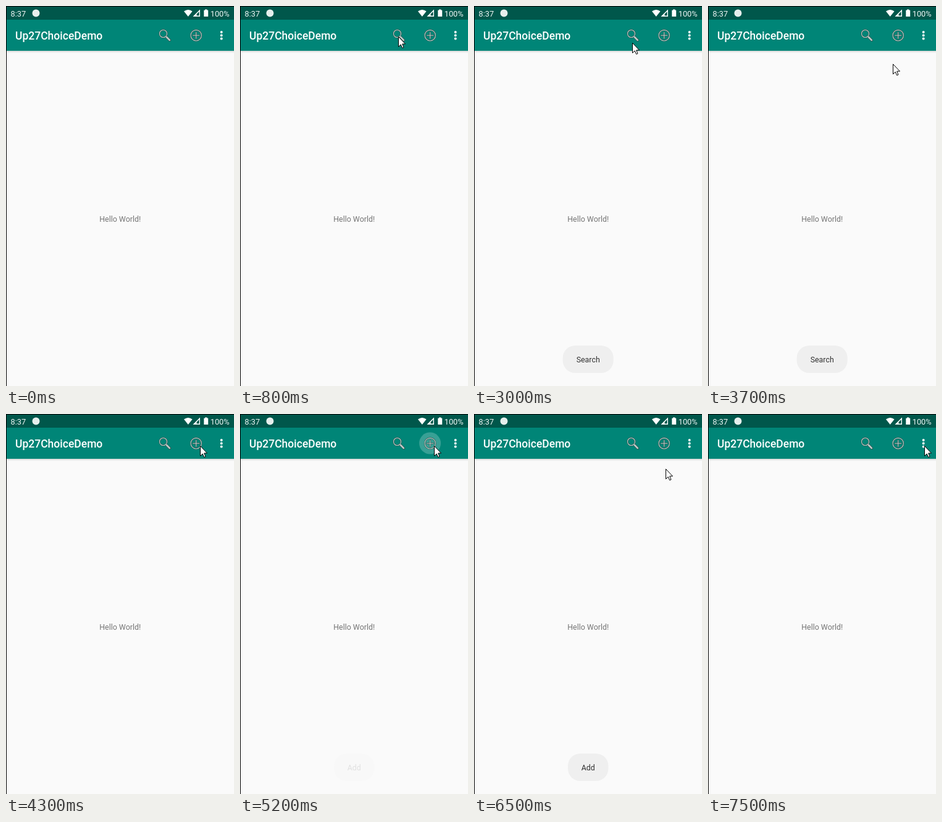
Recreate the animation shown at these times as an HTML page. Size 369x611 px, loop 8 s.

```html
<!DOCTYPE html>
<html lang="en">
<head>
<meta charset="utf-8">
<title>Toolbar menu</title>
<style>
  html, body { margin: 0; width: 100%; height: 100%; overflow: hidden; background: #fafafa; }
  svg { display: block; width: 100%; height: 100%; }
  text { font-family: Roboto, "Noto Sans", sans-serif; font-size: 12.4px; }
  .status { font-size: 12.8px; fill: #f2f7f6; }
  .title { font-size: 17.5px; font-weight: 500; fill: #fff; }
  .icon { fill: none; stroke-linecap: round; }
  .edge { stroke: #2c5b54; stroke-width: 2.5; }
  .core { stroke: #bccbc8; stroke-width: 1.1; }
</style>
</head>
<body>
<svg viewBox="0 0 369 611" xmlns="http://www.w3.org/2000/svg">
  <defs>
    <linearGradient id="shade" x2="0" y2="1">
      <stop offset="0" stop-color="#000" stop-opacity=".17"/>
      <stop offset=".5" stop-color="#000" stop-opacity=".05"/>
      <stop offset="1" stop-color="#000" stop-opacity="0"/>
    </linearGradient>
    <circle id="lens" cx="254.5" cy="44.5" r="6"/>
    <path id="plus" d="M302.700 47.300h10m-5-5v10m8.700-5a8.700 8.700 0 1 1-17.400 0a8.700 8.700 0 1 1 17.400 0"/>
  </defs>

  <rect width="369" height="611" fill="#fafafa"/>
  <rect y="72" width="369" height="4" fill="url(#shade)"/>
  <rect y="22" width="369" height="50" fill="#008577"/>
  <rect width="369" height="22" fill="#00574b"/>

  <!-- status bar -->
  <text class="status" x="7.5" y="16.5">8:37</text>
  <circle cx="48.5" cy="11.5" r="6" fill="#e6efed"/>
  <g fill="#fff">
    <path d="M288 8.600Q294.800 3.400 301.600 8.600L294.800 17Z"/>
    <path d="M314 5.500V17H302.500ZM312.600 9V15.600H306Z" fill-rule="evenodd"/>
    <path d="M303 16.800L308.500 11.300V16.800Z"/>
    <path d="M322 5.500h3.500v1.300h1.700v10.200h-6.900v-10.200h1.700Z"/>
  </g>
  <text class="status" x="330.700" y="16.500">100%</text>

  <!-- toolbar -->
  <text class="title" x="15" y="54">Up27ChoiceDemo</text>
  <circle id="ripple" cy="47" r="17.5" fill="#fff"/>
  <g class="icon">
    <path d="M259.500 49.500L265 55" stroke="#2c5b54" stroke-width="4.200"/>
    <use href="#lens" class="edge"/>
    <path d="M260 50L264.800 54.800" stroke="#c2ccca" stroke-width="2.500"/>
    <use href="#lens" class="core"/>
    <use href="#plus" class="edge"/>
    <use href="#plus" class="core"/>
  </g>
  <path d="M348.700 42v10.600" stroke="#fff" stroke-width="4" stroke-linecap="round"
        stroke-dasharray="0 5.200"/>

  <text x="184.700" y="347" text-anchor="middle" fill="#757575">Hello World!</text>

  <g id="toast">
    <rect id="pill" y="546" height="44" rx="20" fill="#efefef"/>
    <text id="label" x="184.700" y="573" text-anchor="middle" fill="#323232"></text>
  </g>

  <path d="M0 0H369V1H1V611H0Z" fill="#000"/>
  <path id="pointer" d="M.5 .5V16.500L4.200 13L6.700 18.500L9 17.500L6.700 12H11.500Z"
        fill="#fff" stroke="#000"/>
</svg>

<script>
const LOOP = 8000, TICK = 100;
const $ = id => document.getElementById(id);
const set = (el, attrs) => {
  for (const name in attrs) el.setAttribute(name, attrs[name]);
};
const clamp = v => Math.max(0, Math.min(1, v));

// each pointer move is one cubic Bezier curve
const moves = [
  { from: 200, to: 800, curve: [[350, 85], [300, 140], [275, 112], [256, 49]] },
  { from: 3000, to: 4000, curve: [[256, 59], [260, 118], [306, 118], [314, 51]] },
  { from: 6300, to: 7200, curve: [[314, 58], [295, 115], [340, 120], [350, 51]] }
];

const taps = [
  { text: "Search", x: 256.8, width: 82, show: 2000, hide: 3900 },
  { text: "Add", x: 307.5, width: 65.5, show: 5200, hide: 7100 }
];

function bezier([a, b, c, d], u) {
  const v = 1 - u;
  return [0, 1].map(i => Math.round(
    v * v * v * a[i] + 3 * v * v * u * b[i] + 3 * v * u * u * c[i] + u * u * u * d[i]));
}

function drawPointer(t) {
  const move = moves.findLast(m => m.from <= t);
  set($("pointer"), { visibility: move ? "visible" : "hidden" });
  if (!move) return;
  const u = clamp((t - move.from) / (move.to - move.from));
  set($("pointer"), { transform: `translate(${bezier(move.curve, u)})` });
}

function drawTap(t) {
  const tap = taps.findLast(p => p.show <= t) || taps[0];
  const age = t - tap.show;
  const fadeIn = age < 0 ? 0 : clamp(0.12 + age / 360);
  const fadeOut = clamp(1 - (t - tap.hide + TICK) / 500);
  set($("toast"), { opacity: Math.min(fadeIn, fadeOut) });
  set($("pill"), { x: 184.7 - tap.width / 2, width: tap.width });
  $("label").textContent = tap.text;
  set($("ripple"), { cx: tap.x, opacity: age < 0 ? 0 : 0.22 * clamp(1 - age / 300) });
}

function loop() {
  const t = performance.now() % LOOP;
  const step = Math.floor(t / TICK) * TICK;
  drawPointer(step);
  drawTap(step);
  requestAnimationFrame(loop);
}
loop();
</script>
</body>
</html>
```
